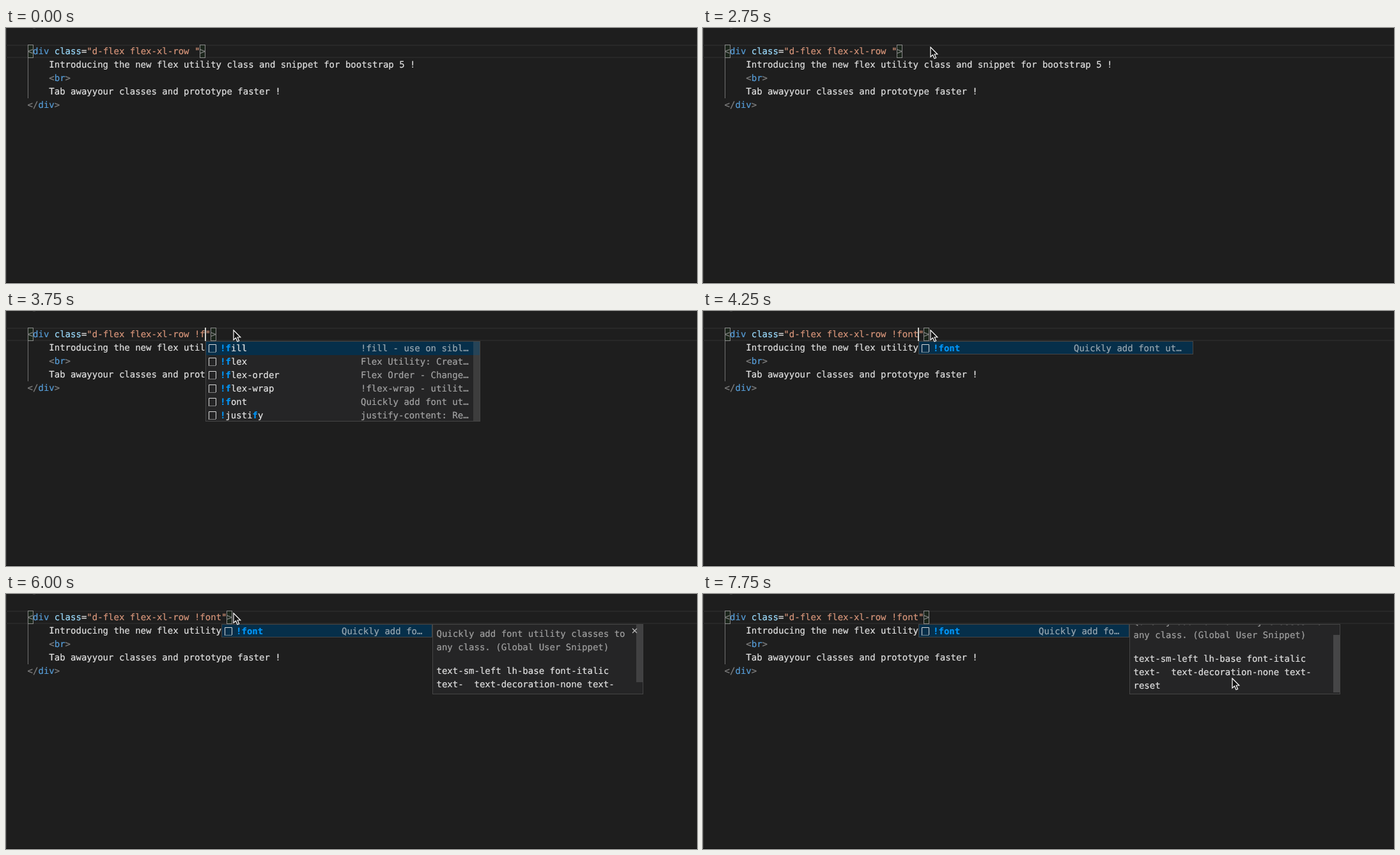
Animation of 1081x399 px, one loop 8 s. Source, as an HTML page:

```html
<!DOCTYPE html>
<html lang="en">
<head>
<meta charset="utf-8">
<title>Snippet completion</title>
<style>
html, body { margin: 0; width: 100%; height: 100%; overflow: hidden; background: #1e1e1e; }
#stage {
  position: relative; width: 1081px; height: 399px; overflow: hidden;
  background: #1e1e1e; color: #e2e2e2;
  font: 14px/21px "DejaVu Sans Mono", monospace;
  text-rendering: geometricPrecision; white-space: pre;
  -webkit-text-stroke: .2px;
}
#stage div, #stage svg { position: absolute; box-sizing: border-box; }
#edge { left: 0; top: 0; width: 1px; height: 399px; background: #383838; }
#base { left: 0; top: 398px; width: 1081px; height: 1px; background: #121212; }
#speck { left: 42px; top: 0; width: 4px; height: 1px; background: #3a3a3a; }
#current { left: 0; top: 26px; width: 1081px; height: 21px; border: solid #282828; border-width: 2px 0; }
#guide { left: 34px; top: 47px; width: 1px; height: 63px; background: #707070; }
.pair { top: 26px; width: 9px; height: 21px; border: 1px solid #888; background: #0064001a; }
#code { left: 33.6px; top: 27px; }
.p { color: #808080; }
.t { color: #569cd6; }
.a { color: #9cdcfe; }
.s { color: #d7957a; }
#caret { top: 26px; width: 2px; height: 21px; background: #d0d0cc; }
.panel { top: 47px; overflow: hidden; background: #252526; border: 1px solid #454545; }
.row { left: 0; width: 100%; height: 21px; }
.row:first-child { background: #062f4a; }
.row svg { left: 3px; top: 3px; }
.label, .desc { top: 1px; }
.label { left: 22px; color: #e6e6e6; }
.label b { color: #0097fb; }
.desc { opacity: .67; }
.bar { right: 0; width: 10px; background: #797979; }
#docs { left: 667px; width: 330px; height: 110px; }
#page { left: 0; top: 0; width: 100%; }
#intro { left: 5.5px; top: 5px; color: #a0a0a0; }
#body { left: 5.5px; top: 63px; }
#close { left: 311px; top: 5px; }
</style>
</head>
<body>
<div id="stage">
  <div id="edge"></div><div id="base"></div><div id="speck"></div>
  <div id="current"></div><div id="guide"></div>
  <div class="pair" style="left:34px"></div><div class="pair" id="endPair"></div>
  <div id="code"><span class="p">&lt;</span><span class="t">div</span> <span class="a">class</span>=<span class="s">"d-flex flex-xl-row <span id="typed"></span>"</span><span class="p">&gt;</span>
    Introducing the new flex utility class and snippet for bootstrap 5 !
    <span class="p">&lt;</span><span class="t">br</span><span class="p">&gt;</span>
    Tab awayyour classes and prototype faster !
<span class="p">&lt;/</span><span class="t">div</span><span class="p">&gt;</span></div>
  <div id="caret"></div>
  <div class="panel" id="list"></div>
  <div class="panel" id="docs">
    <div id="page">
      <div id="intro">Quickly add font utility classes to
any class. (Global User Snippet)</div>
      <div id="body">text-sm-left lh-base font-italic
text-  text-decoration-none text-
reset</div>
      <svg id="close" width="9" height="9" stroke="#c5c5c5" stroke-width="1.1"><path d="M1 1 8 8M8 1 1 8"/></svg>
    </div>
    <div class="bar" id="docBar" style="height:90px"></div>
  </div>
  <svg id="mouse" width="14" height="21" viewBox="-1 -1 14 21"><path d="M0 0V15.2L3.5 12 6 17.8 8.6 16.7 6.2 11H10.8Z" fill="#111" stroke="#fff" stroke-width="1.2"/></svg>
</div>
<script>
const LOOP = 8000, ORIGIN = 33.6, ADVANCE = 8.428, TYPED_AT = 31;
const $ = id => document.getElementById(id);
const column = n => Math.round(ORIGIN + n * ADVANCE);

const snippets = [
  ['!align', 'Flex-Align: https:/'],
  ['!color', 'Quickly add color u'],
  ['!direction', 'Flex Direction: Set'],
  ['!display', 'Display Utilities: '],
  ['!fill', '!fill - use on sibl'],
  ['!flex', 'Flex Utility: Creat'],
  ['!flex-order', 'Flex Order - Change'],
  ['!flex-wrap', '!flex-wrap - utilit'],
  ['!font', 'Quickly add font ut'],
  ['!grow-shrink', '!grow-shrink - util'],
  ['!justify', 'justify-content: Re'],
  ['!MQ', 'Scope a css class t']
];

// Each step lists only what changes at that time.
const steps = [
  [0, { query: '', caret: 0, mouse: null, listBar: 0, docs: false, docBar: 0, scroll: 0 }],
  [1000, { mouse: [291, 41] }],
  [1250, { mouse: [292, 41], caret: 1 }],
  [1750, { mouse: [356, 30], caret: 0 }],
  [2250, { caret: 1 }],
  [2750, { caret: 0 }],
  [3000, { query: '!', caret: 1, listBar: .12 }],
  [3250, { listBar: .4 }],
  [3500, { caret: 0, listBar: .2 }],
  [3750, { query: '!f', caret: 1, listBar: .28 }],
  [4000, { query: '!fo', listBar: 0 }],
  [4250, { query: '!font' }],
  [4750, { caret: 0 }],
  [5250, { caret: 1 }],
  [5500, { docs: true, docBar: .4 }],
  [5750, { caret: 0 }],
  [6000, { docBar: .33 }],
  [6250, { caret: 1, docBar: .12, mouse: [354, 33] }],
  [6500, { docBar: 0, mouse: [800, 117] }],
  [6750, { caret: 0, docBar: .4, mouse: [828, 132] }],
  [7250, { caret: 1, scroll: 5 }],
  [7500, { scroll: 14 }],
  [7750, { caret: 0, scroll: 19 }]
];

// Bold the query letters in order; null when they are not all present.
function highlight(name, query) {
  let i = 0;
  const html = [...name].map(c => c === query[i] ? (i++, `<b>${c}</b>`) : c).join('');
  return i === query.length ? html : null;
}

const icon = `<svg width="14" height="15" fill="none" stroke="#d8d8d8">
  <path d="M1.5 13V1.5H12.5V13"/><path d="M1 13.5H13" stroke-dasharray="1 1"/></svg>`;

function drawList(s, left) {
  const list = $('list');
  list.style.display = s.query ? '' : 'none';
  if (!s.query) return;
  const found = snippets.filter(([name]) => highlight(name, s.query))
    .sort((a, b) => b[0].startsWith(s.query) - a[0].startsWith(s.query));
  const [width, descLeft, chars] = s.docs ? [330, 187, 14] : [430, 242, 19];
  const height = found.length * 21;
  const barHeight = s.query === '!' ? 189 : height - 2;
  Object.assign(list.style, { left: left + 'px', width: width + 'px', height: height + 'px' });
  list.innerHTML = found.map(([name, desc], i) =>
    `<div class="row" style="top:${i * 21}px">${icon}` +
    `<div class="label">${highlight(name, s.query)}</div>` +
    `<div class="desc" style="left:${descLeft}px">${desc.slice(0, chars)}…</div></div>`).join('') +
    `<div class="bar" style="top:0;height:${barHeight}px;opacity:${s.listBar}"></div>`;
}

function draw(s) {
  const end = TYPED_AT + s.query.length;
  $('typed').textContent = s.query;
  $('endPair').style.left = column(end + 1) + 'px';
  $('caret').style.left = column(end) - 1 + 'px';
  $('caret').style.opacity = s.caret;
  drawList(s, column(end));
  $('docs').style.display = s.docs ? '' : 'none';
  $('page').style.top = -s.scroll + 'px';
  $('docBar').style.top = Math.round(s.scroll * 16 / 19) + 'px';
  $('docBar').style.opacity = s.docBar;
  $('mouse').style.display = s.mouse ? '' : 'none';
  if (s.mouse) {
    $('mouse').style.left = s.mouse[0] - 1 + 'px';
    $('mouse').style.top = s.mouse[1] - 1 + 'px';
  }
}

const start = performance.now();
let shown = 0;
function tick(now) {
  const time = Math.max(0, now - start) % LOOP;
  const past = steps.filter(([at]) => at <= time);
  if (past.length !== shown) {
    shown = past.length;
    draw(Object.assign({}, ...past.map(([, change]) => change)));
  }
  requestAnimationFrame(tick);
}
tick(start);
</script>
</body>
</html>
```
